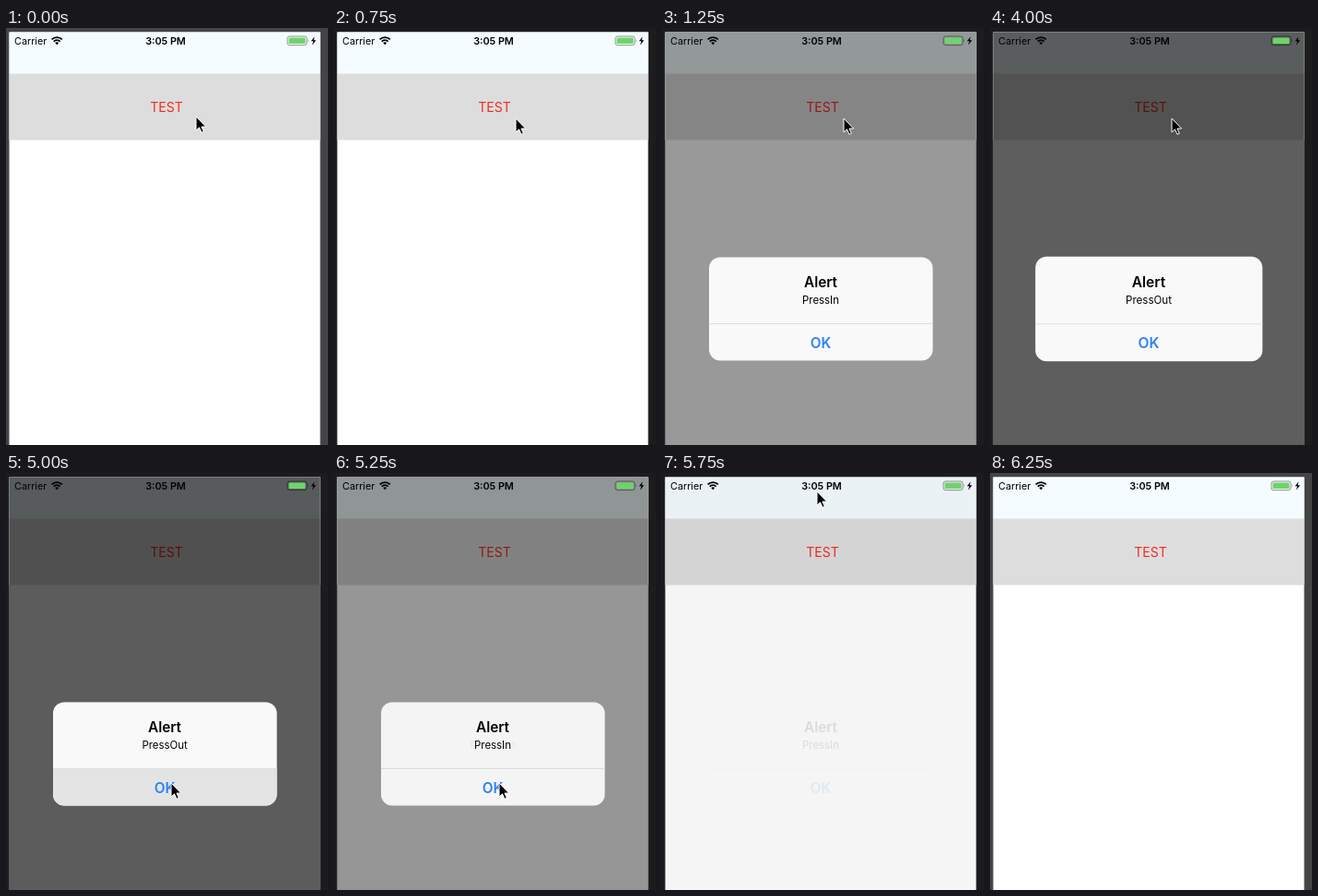
Write an HTML page that moves like this. It is 349 px wide and 452 px high and loops after 6500 ms.

```html
<!DOCTYPE html>
<html lang="en">
<head>
<meta charset="utf-8">
<title>Alert demo</title>
<style>
  html, body { margin: 0; width: 100%; height: 100%; overflow: hidden; }
  svg { display: block; width: 349px; height: 452px; font-family: Inter, Roboto, sans-serif; }
  .mid { text-anchor: middle; }
  .bold { font-weight: 600; }
</style>
</head>
<body>
<svg viewBox="0 0 349 452">
  <rect id="bezel" width="349" height="452"/>
  <g id="screen">
    <rect x="3.5" y="4.5" width="337" height="448" fill="#fff"/>
    <rect x="3.5" y="4.5" width="337" height="45" fill="#f5fcff"/>
    <rect x="3.5" y="49.5" width="337" height="72" fill="#ddd"/>
    <text class="mid" x="174" y="91" font-size="14" fill="#f52b20">TEST</text>
  </g>
  <g id="alerts"></g>
  <g id="status" font-size="10.8">
    <text x="9" y="18">Carrier</text>
    <text class="mid bold" x="173" y="18">3:05 PM</text>
    <g fill="none" stroke="#000" stroke-width="1.8">
      <path d="M49.6 12.4a8 8 0 0 1 11.2 0M51.7 14.7a5 5 0 0 1 7 0"/>
    </g>
    <path d="M55.2 18.3l-2-2.2a2.9 2.9 0 0 1 4 0z"/>
    <rect x="305" y="9" width="21" height="9.6" rx="2.5" fill="none" stroke="#000" stroke-opacity=".42"/>
    <rect x="306.5" y="10.5" width="18" height="6.6" rx="1.2" fill="#6fd36b"/>
    <path d="M327.2 12.3q1.4 1.5 0 3z" opacity=".5"/>
    <path d="M334.6 9.3l-4 5h2.5l-1.2 4.2 4.2-5.3h-2.6z"/>
  </g>
  <path id="cursor" d="M0 0V15L3.5 11.8 6 17.3 8.3 16.3 5.9 11H10.6Z" stroke="#fff" stroke-width="1" stroke-linejoin="round"/>
</svg>
<script>
const $ = id => document.getElementById(id);

$("alerts").innerHTML = ["PressIn", "PressOut"].map((message, i) => `
  <rect id="dim${i}" x="3.5" y="4.5" width="337" height="448"/>
  <g id="alert${i}">
    <rect x="51" y="248.5" width="242.5" height="112" rx="12" fill="#f9f9f9"/>
    <path id="press${i}" d="M51 320.5H293.5V348.5a12 12 0 0 1-12 12H63a12 12 0 0 1-12-12Z" fill="#e4e4e4"/>
    <path d="M51 320.5H293.5" stroke="#dedede"/>
    <text class="mid bold" x="172" y="281" font-size="15.3">Alert</text>
    <text class="mid" x="172" y="299" font-size="11.4">${message}</text>
    <text class="mid bold" x="172" y="346.5" font-size="15.3" fill="#2f80f3">OK</text>
  </g>`).join("");

const hidden = { dim: 0, alpha: 0 };
const opening = { dim: .39, alpha: 1, scale: 1.015 };
const open = { dim: .4, alpha: 1 };
const pressed = { ...open, press: 1 };

// Each step: start in ms, then only the properties that change.
const steps = [
  [0, { bezel: "#444", cursor: [206, 96], alerts: [hidden, hidden] }],
  [250, { cursor: [197, 98] }],
  [750, { bezel: "#1c1c1c" }],
  [1000, { alerts: [opening, hidden] }],
  [1250, { alerts: [open, hidden] }],
  [4000, { alerts: [open, opening] }],
  [4250, { alerts: [open, open] }],
  [4500, { cursor: [208, 263] }],
  [4750, { cursor: [182, 334] }],
  [5000, { cursor: [179, 336], alerts: [open, pressed] }],
  [5250, { alerts: [open, { dim: .02, alpha: .05 }] }],
  [5500, { alerts: [pressed, hidden] }],
  [5750, { cursor: [168, 20], alerts: [{ dim: .04, alpha: .1 }, hidden] }],
  [6000, { cursor: null, alerts: [hidden, hidden] }],
  [6250, { bezel: "#444" }]
];

function drawAlert({ dim, alpha, scale = 1, press = 0 }, i) {
  $("dim" + i).setAttribute("opacity", dim);
  $("press" + i).setAttribute("opacity", press);
  const box = $("alert" + i);
  box.setAttribute("opacity", alpha);
  box.setAttribute("transform", `translate(172 304.5) scale(${scale}) translate(-172 -304.5)`);
}

function draw(now) {
  const t = now % 6500;
  const state = Object.assign({}, ...steps.filter(([start]) => start <= t).map(([, change]) => change));
  $("bezel").setAttribute("fill", state.bezel);
  $("cursor").setAttribute("transform", `translate(${state.cursor || [-50, -50]})`);
  state.alerts.forEach(drawAlert);
}

const begin = performance.now();
function tick() {
  draw(performance.now() - begin);
  requestAnimationFrame(tick);
}
tick();
</script>
</body>
</html>
```
